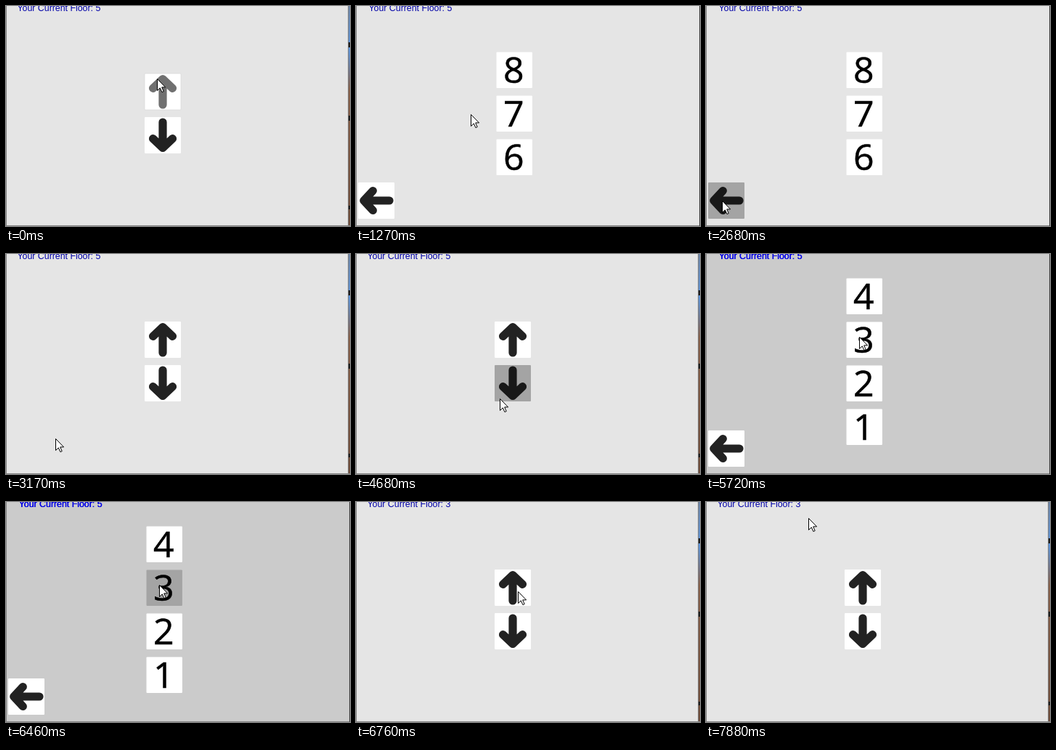
These frames come from a looping animation (474x303 px, 8000 ms). An HTML page:

```html
<!DOCTYPE html>
<html lang="en">
<head>
<meta charset="utf-8">
<title>Floor panel</title>
<style>
  html, body { margin: 0; width: 100%; height: 100%; overflow: hidden; background: #e5e5e5; }
  svg { display: block; width: 474px; height: 303px; }
  .label { font: 12.35px "Liberation Sans", Arial, sans-serif; fill: #0000a8; }
  .digit { font: 50px "Open Sans", "Noto Sans", sans-serif; text-anchor: middle; fill: #000; stroke: #000; stroke-width: .5; }
  .arrow { fill: none; stroke: #222; stroke-width: 11.2; stroke-linecap: round; stroke-linejoin: round; }
  .face { fill: #fff; }
  .line { fill: #868686; }
  .pressed .face { fill: #a4a4a4; }
  .pressed .arrow { stroke: #181818; }
  .faded .arrow { stroke: #707070; }
  .faded .face { stroke: #d4d4d4; stroke-width: .6; }
</style>
</head>
<body>
<svg viewBox="0 0 474 303">
  <defs>
    <linearGradient id="view" x1="0" y1="0" x2="0" y2="1">
      <stop offset="0" stop-color="#6f86a6"/>
      <stop offset=".2" stop-color="#5f94d6"/>
      <stop offset=".38" stop-color="#86604a"/>
      <stop offset="1" stop-color="#6d4c3a"/>
    </linearGradient>
  </defs>
  <rect id="wall" width="474" height="303"/>
  <g id="strip">
    <rect x="472" width="2" height="302" fill="url(#view)"/>
    <path d="M473 50v7M473 151v7M473 275v5" stroke="#1c1c1c" stroke-width="2"/>
  </g>
  <rect class="line" width="1" height="303"/>
  <rect class="line" y="302" width="474" height="1"/>
  <rect class="line" id="edge" width="1" height="303"/>
  <text class="label" id="glow" x="18" y="7" style="fill:#00f"></text>
  <text class="label" id="label" y="7"></text>
  <g id="main"></g>
  <g id="high"></g>
  <g id="low"></g>
  <g id="back"></g>
  <path id="cursor" d="M.5 .5V16.5L4.3 12.9 6.9 18.6 9.2 17.6 6.7 11.9H11.6Z" fill="#fff" stroke="#000"/>
</svg>
<script>
const LOOP = 8000, STEP = 135;
const $ = id => document.getElementById(id);
const buttons = {};

function button(name, parent, x, y, size, inner) {
  $(parent).insertAdjacentHTML('beforeend',
    `<g transform="translate(${x} ${y})"><rect class="face" width="${size}" height="${size}" rx="1"/>${inner}</g>`);
  buttons[name] = $(parent).lastElementChild;
}
const arrow = turn =>
  `<path class="arrow" transform="rotate(${turn} 25 25)" d="M25 43V8M11.5 20.3L25 7.7 38.5 20.3"/>`;

button('up', 'main', 191, 93, 50, arrow(0));
button('down', 'main', 191, 153, 50, arrow(180));
button('back', 'back', 3, 243, 50, arrow(-90));

function floors(parent, top, count, y) {
  for (let i = 0; i < count; i++) {
    button(top - i, parent, 193.5, y + 60 * i, 49.4,
      `<text class="digit" x="23.9" y="42.6">${top - i}</text>`);
  }
}
floors('high', 8, 3, 63.6);
floors('low', 4, 4, 33.6);

const clicks = [
  { down: 0, up: 650, name: 'up', opens: 'high' },
  { down: 2680, up: 2800, name: 'back', opens: 'main' },
  { down: 4680, up: 4800, name: 'down', opens: 'low' },
  { down: 6460, up: 6610, name: '3', opens: 'main' }
];

// pointer strokes: start time, number of even steps, end point
const strokes = [
  [0, 1, 208, 100], [650, 1, 217, 69], [1270, 1, 158, 149], [1420, 1, 22, 268],
  [3170, 1, 68, 254], [3290, 3, 223, 154], [4680, 1, 198, 199], [5600, 1, 211, 114],
  [6610, 1, 223, 123], [7190, 3, 99, 49], [7610, 3, 141, 22]
];

function pointer(t) {
  const i = strokes.findLastIndex(s => s[0] <= t);
  const [start, steps, x, y] = strokes[i];
  const [, , fromX, fromY] = strokes[Math.max(0, i - 1)];
  const p = Math.min(1, (Math.floor((t - start) / STEP) + 1) / steps);
  return [fromX + (x - fromX) * p, fromY + (y - fromY) * p].map(Math.round);
}

const show = (id, on) => $(id).style.display = on ? '' : 'none';

function draw(t) {
  const last = clicks.findLast(c => c.up <= t);
  const held = clicks.find(c => c.down <= t && t < c.up);
  const screen = last ? last.opens : 'main';
  const floor = last && last.name === '3' ? 3 : 5;
  const low = screen === 'low';
  // the window stays wide for one step after returning to the main screen
  const wide = screen !== 'main' || Boolean(last && t < last.up + STEP);

  $('wall').setAttribute('fill', low ? '#cbcbcb' : '#e5e5e5');
  for (const id of ['main', 'high', 'low']) show(id, id === screen);
  show('back', screen !== 'main');
  show('strip', !wide);
  show('glow', low);
  $('edge').setAttribute('x', wide ? 473 : 471);
  $('edge').style.fill = wide ? '#444' : '';
  $('main').setAttribute('transform', `translate(${wide ? 2 : 0} 0)`);

  $('label').setAttribute('x', wide ? 17.5 : 15.5);
  $('label').style.fill = low ? '#0000dc' : '';
  $('label').textContent = $('glow').textContent = 'Your Current Floor: ' + floor;

  for (const name in buttons) {
    const look = name === 'up' ? 'faded' : 'pressed';
    buttons[name].setAttribute('class', held && held.name === name ? look : '');
  }
  $('cursor').setAttribute('transform', `translate(${pointer(t)})`);
}

const start = performance.now();
function tick() {
  draw((performance.now() - start) % LOOP);
  requestAnimationFrame(tick);
}
tick();
</script>
</body>
</html>
```
